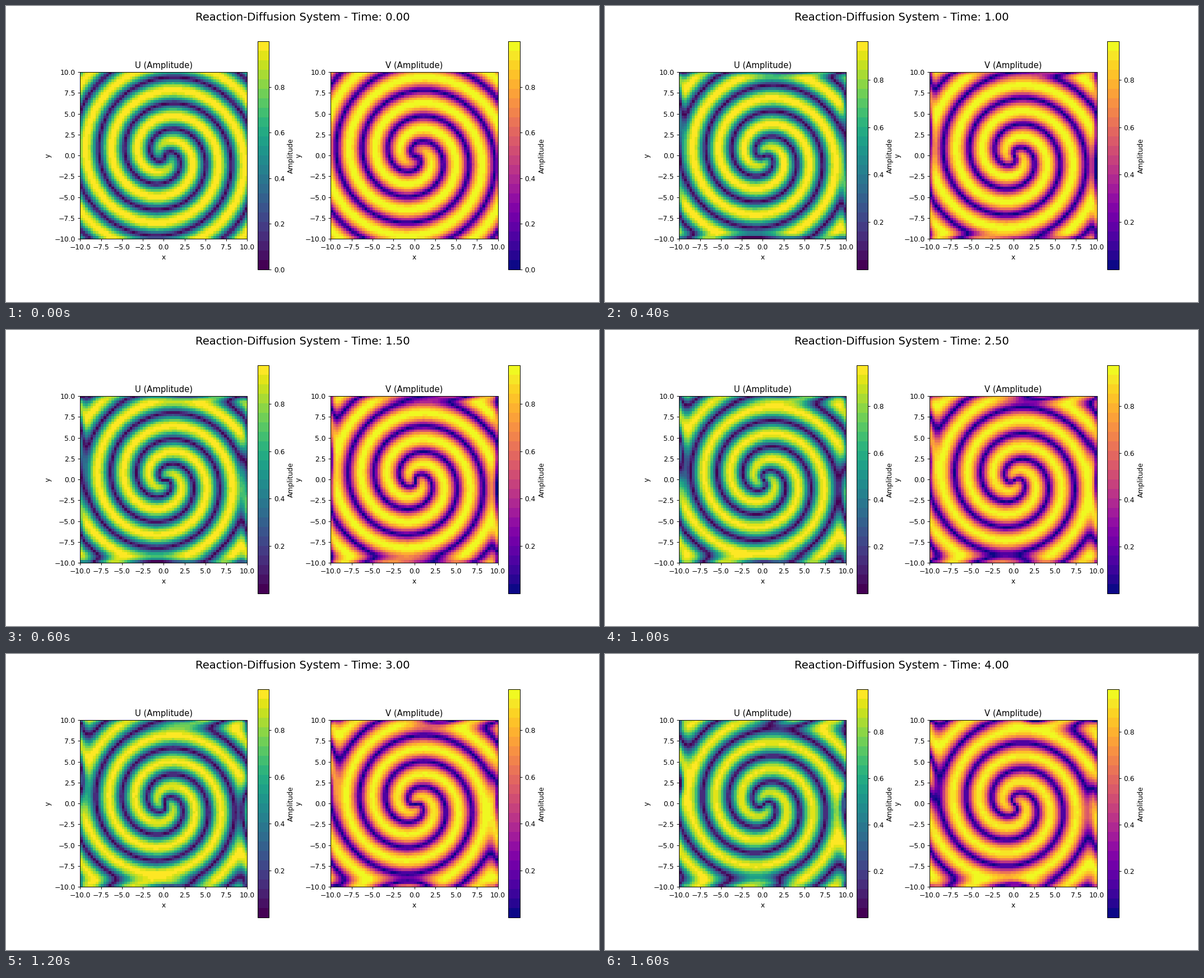
Recreate the animation shown at these times as a matplotlib script. Size 1058x529 px, loop 1.8 s.

```python
import numpy as np
import matplotlib.pyplot as plt
from matplotlib.animation import FuncAnimation

N = 64               # grid cells per side
LENGTH = 20.0        # side of the periodic domain
DIFFUSION = 0.1
BETA = 1.0
FRAME_TIME = 0.5     # simulated time between frames
FRAMES = 9
SUBSTEPS = 20
COLOR_LEVELS = 24

wave = 2 * np.pi * np.fft.fftfreq(N, LENGTH / N)
K2 = wave[None, :] ** 2 + wave[:, None] ** 2


def laplacian(w):
    return np.fft.ifft2(-K2 * np.fft.fft2(w)).real


def rate(state):
    """Lambda-omega reaction with diffusion."""
    u, v = state
    a2 = u * u + v * v
    grow, spin = 1 - a2, -BETA * a2
    return np.array([
        grow * u - spin * v + DIFFUSION * laplacian(u),
        spin * u + grow * v + DIFFUSION * laplacian(v),
    ])


def rk4(state, dt):
    k1 = rate(state)
    k2 = rate(state + dt / 2 * k1)
    k3 = rate(state + dt / 2 * k2)
    k4 = rate(state + dt * k3)
    return state + dt / 6 * (k1 + 2 * k2 + 2 * k3 + k4)


def simulate():
    axis = np.linspace(-LENGTH / 2, LENGTH / 2, N + 1)[:-1]
    x, y = np.meshgrid(axis, axis)
    r, angle = np.hypot(x, y), np.arctan2(y, x)
    state = np.tanh(r) * np.array([np.cos(angle - r), np.sin(angle - r)])
    states = [state]
    for _ in range(FRAMES - 1):
        for _ in range(SUBSTEPS):
            state = rk4(state, FRAME_TIME / SUBSTEPS)
        states.append(state)
    return np.abs(states)


amplitudes = simulate()

plt.rcParams["font.family"] = "DejaVu Sans"
fig, axes = plt.subplots(1, 2, figsize=(12, 6), dpi=1058 / 12)
heading = fig.suptitle("", fontsize=16)


def add_panel(ax, name, cmap, field):
    image = ax.imshow(field, extent=[-10, 10, -10, 10],
                      cmap=plt.get_cmap(cmap, COLOR_LEVELS))
    ax.set_title(f"{name} (Amplitude)")
    ax.set_xlabel("x")
    ax.set_ylabel("y")
    fig.colorbar(image, ax=ax, label="Amplitude")
    return image


images = [
    add_panel(ax, name, cmap, field)
    for ax, name, cmap, field in zip(
        axes, "UV", ("viridis", "plasma"), amplitudes[0])
]


def update(frame):
    for image, field in zip(images, amplitudes[frame]):
        image.set_data(field)
        image.set_clim(field.min(), field.max())
    heading.set_text(
        f"Reaction-Diffusion System - Time: {frame * FRAME_TIME:.2f}")
    return [*images, heading]


anim = FuncAnimation(fig, update, frames=FRAMES, interval=200,
                     repeat=True, repeat_delay=0, blit=False)
plt.show()
```
